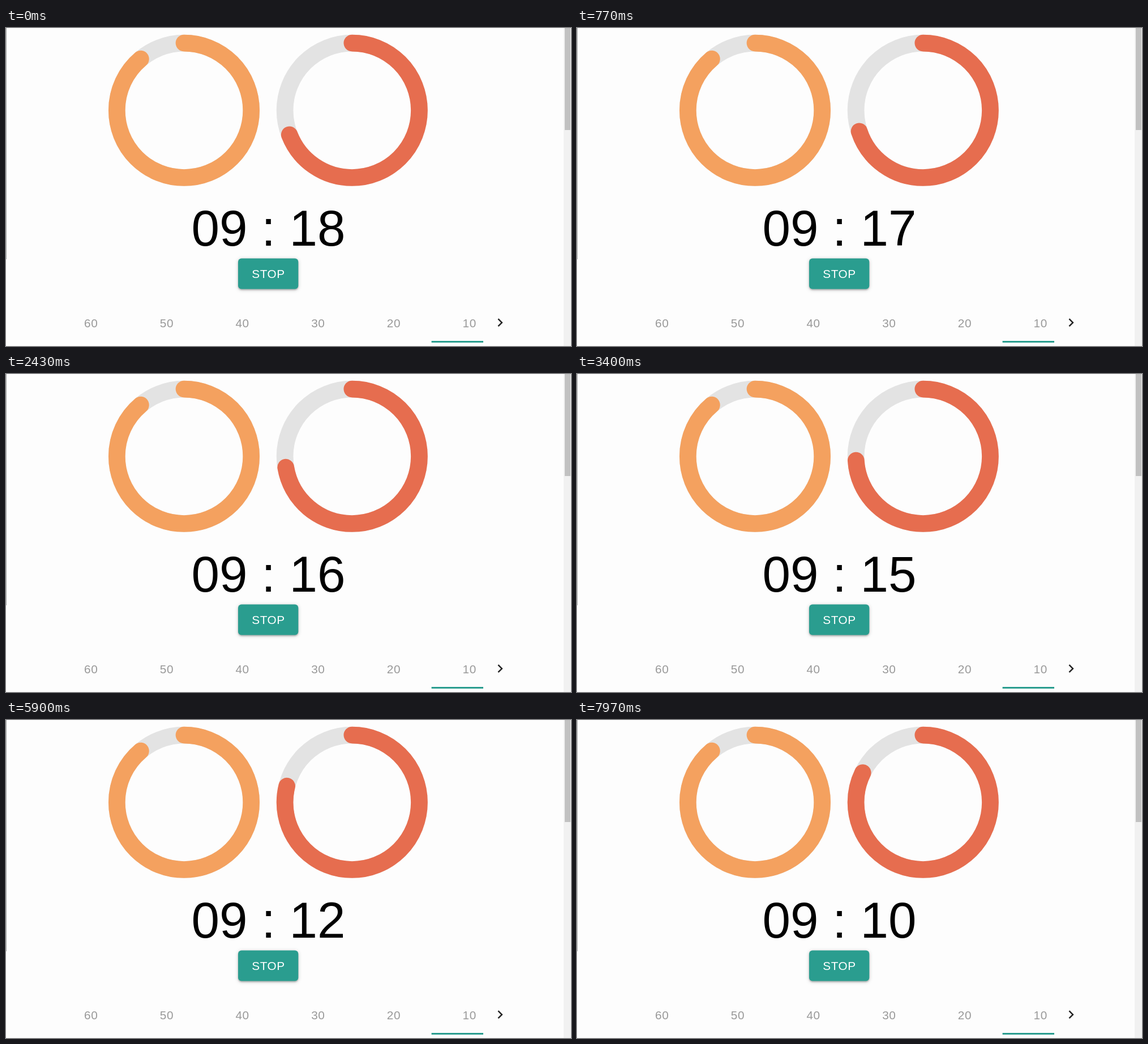
Animation, 998 px wide and 561 px high, one loop 8000 ms. Source, as an HTML page:

```html
<!DOCTYPE html>
<html lang="en">
<head>
<meta charset="utf-8">
<title>Countdown timer</title>
<style>
  html, body { margin: 0; width: 100%; height: 100%; overflow: hidden; background: #fdfdfd; }
  svg { display: block; width: 998px; height: 561px; font-family: "Liberation Sans", Arial, sans-serif; }
  text { text-anchor: middle; }
  .ring circle { fill: none; stroke-width: 29.7; }
  .trail { stroke: #e3e3e3; }
  .bar { stroke-linecap: round; }
  .label { font-size: 20.76px; letter-spacing: .59px; }
  .button {
    filter: drop-shadow(0 2px 1px rgba(0, 0, 0, .2)) drop-shadow(0 1.5px 3px rgba(0, 0, 0, .2));
  }
</style>
</head>
<body>
<svg viewBox="0 0 998 561">
  <rect width="998" height="561" fill="#fdfdfd"/>
  <rect width="1" height="408" fill="#a6a8a8"/>
  <rect x="985" width="13" height="561" fill="#f1f1f1"/>
  <rect x="987" width="10" height="180" fill="#c1c1c1"/>

  <g class="ring" transform="translate(314.5 145.3) rotate(-90)">
    <circle class="trail" r="118.7"/>
    <circle class="bar" id="minutes" r="118.7" pathLength="360" stroke="#f4a15f"/>
  </g>
  <g class="ring" transform="translate(611.3 145.3) rotate(-90)">
    <circle class="trail" r="118.7"/>
    <circle class="bar" id="seconds" r="118.7" pathLength="360" stroke="#e66d4f"/>
  </g>

  <text id="clock" x="463.5" y="384" font-size="89"></text>

  <rect class="button" x="410" y="406.5" width="106.3" height="54" rx="5.9" fill="#2a9d8f"/>
  <text class="label" x="463.5" y="441" fill="#fff">STOP</text>

  <g id="tabs" fill="#999"></g>
  <rect x="751.6" y="552" width="91.4" height="3" fill="#2a9d8f"/>
  <path transform="translate(857.9 504.8) scale(1.236)" fill="#222"
        d="M10 6 8.59 7.41 13.17 12l-4.58 4.59L10 18l6-6z"/>
</svg>
<script>
  const LOOP = 8000, FIRST_TICK = 680, TICK = 1000, GLIDE = 300;
  const START = 18;      // seconds shown at the beginning
  const FILL = 0.987;    // share of the circle that a full bar covers

  const $ = id => document.getElementById(id);
  const clamp = (v, lo, hi) => Math.min(hi, Math.max(lo, v));

  // CSS "ease": cubic-bezier(.25, .1, .25, 1)
  function ease(x) {
    if (x <= 0 || x >= 1) return clamp(x, 0, 1);
    const curve = (s, a, b) => 3 * (1 - s) ** 2 * s * a + 3 * (1 - s) * s * s * b + s ** 3;
    let lo = 0, hi = 1;
    for (let i = 0; i < 24; i++) {
      const mid = (lo + hi) / 2;
      if (curve(mid, .25, .25) < x) lo = mid; else hi = mid;
    }
    return curve(lo, .1, 1);
  }

  function setBar(id, share) {
    $(id).setAttribute("stroke-dasharray", `${share * FILL * 360} 720`);
  }

  function render(t) {
    const ticks = Math.max(0, Math.floor((t - FIRST_TICK) / TICK) + 1);
    const since = t - FIRST_TICK - (ticks - 1) * TICK;
    const moved = ticks ? ticks - 1 + ease(since / GLIDE) : 0;
    const time = `09 : ${START - ticks}`;
    if ($("clock").textContent !== time) $("clock").textContent = time;
    setBar("seconds", (60 - START + moved) / 60);
  }

  $("tabs").innerHTML = [60, 50, 40, 30, 20, 10].map((n, i) =>
    `<text class="label" x="${150.2 + i * 133.7}" y="527.5">${n}</text>`).join("");
  setBar("minutes", 0.9);

  const begin = performance.now();
  function frame() {
    render((performance.now() - begin) % LOOP);
    requestAnimationFrame(frame);
  }
  render(0);
  requestAnimationFrame(frame);
</script>
</body>
</html>
```
